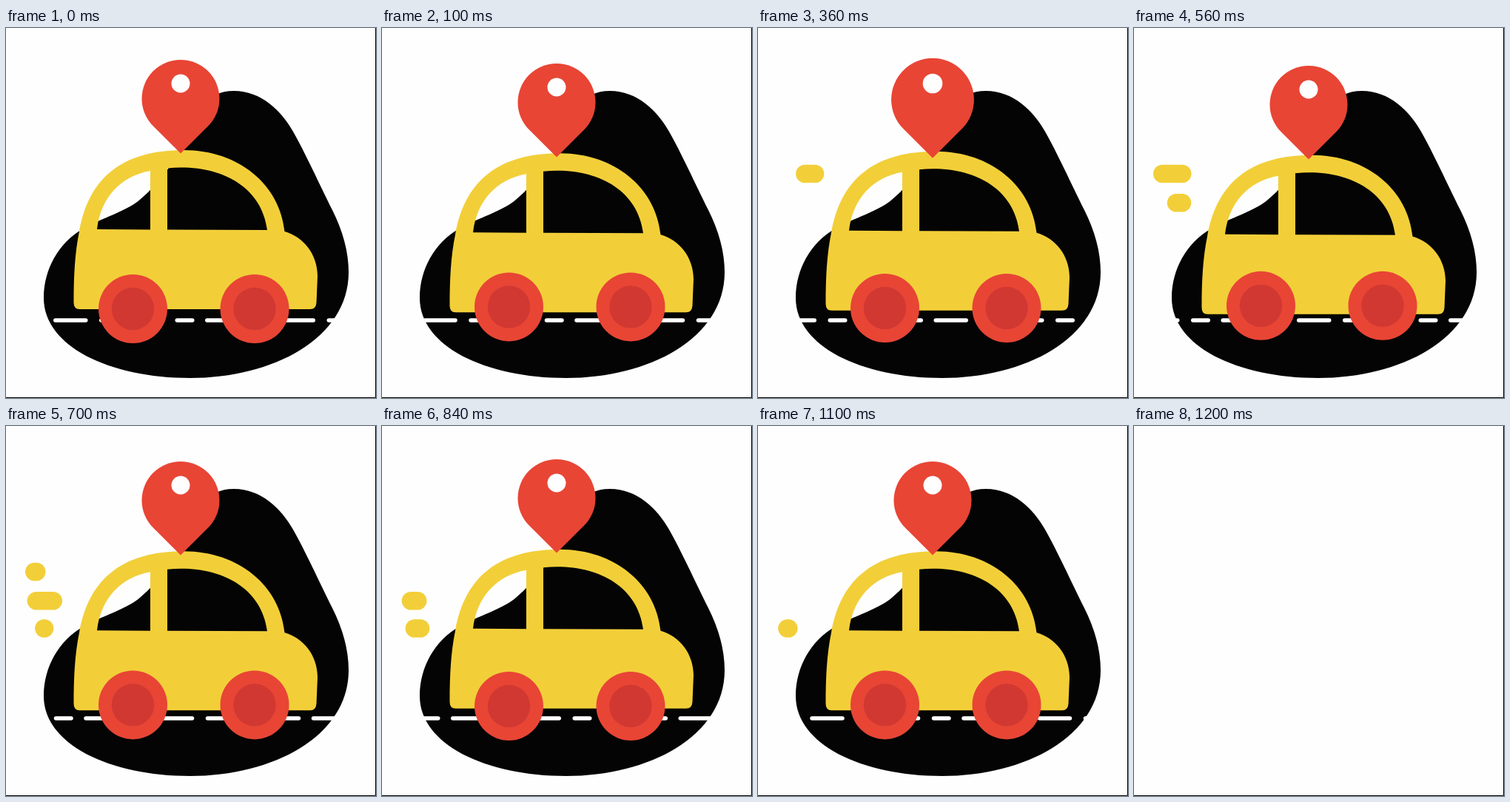
Animation, 500 px wide and 500 px high, one loop 1.22 s. Source, as an HTML page:

```html
<!DOCTYPE html>
<html lang="en">
<head>
<meta charset="utf-8">
<title>Car on the road</title>
<style>
  html, body { margin: 0; height: 100%; overflow: hidden; background: #fefefe; }
  svg { display: block; width: 100%; height: 100%; }
  .yellow { fill: #f2cf39; }
  .red { fill: #e84535; }
  .dark { fill: #d13832; }
  .streak { stroke: #f2cf39; stroke-width: 24.6; stroke-linecap: round; }
</style>
</head>
<body>
<svg viewBox="0 0 500 500">
  <g id="scene">
    <path fill="#040404" d="M308 85C345 85 372 112 388 140C404 168 424 212 441 246C455 274 463 302 463 330
      C463 420 360 473 249 473C140 473 51 430 51 365C51 325 72 290 103 272
      C128 257 165 247 182 231C205 212 225 185 240 155C255 115 270 85 308 85Z"/>
    <g id="road" stroke="#fefefe" stroke-width="5.6" stroke-linecap="round"></g>
    <path id="body" class="yellow" fill-rule="evenodd" d="M99.500 380Q91.500 380 91.500 371C91.500 335 93 304 99 275
      C112 200 160 165 240 165C315 165 370 212 376.500 275C402 282 421 306 421 335L419.500 371Q419 380 411 380Z
      M123 272C128 229 155 200 195 193V272.500Z
      M218 189.500C285 183 345 211 353 273L218 272.500Z"/>
    <g id="wheels">
      <circle class="red" cx="171.500" cy="379.500" r="46.500"/>
      <circle class="dark" cx="171.500" cy="379.500" r="28.700"/>
      <circle class="red" cx="336" cy="379.500" r="46.500"/>
      <circle class="dark" cx="336" cy="379.500" r="28.700"/>
    </g>
    <g id="pin">
      <path class="red" d="M236 169.500L198.900 132.600A52.500 52.500 0 1 1 273.100 132.600Z"/>
      <circle cx="236" cy="75" r="12.500" fill="#fefefe"/>
    </g>
    <g id="streaks"></g>
  </g>
  <path d="M499.500 0V499.500H0" fill="none" stroke="#000"/>
</svg>
<script>
const LOOP = 1220, STEP = 20, BOB = 400, PERIOD = 102.5;
const el = id => document.getElementById(id);
const ease = (t, start, length) => {
  const u = Math.min(1, Math.max(0, (t - start) / length));
  return u * u * (3 - 2 * u);
};

function addLine(parent, x1, x2, y, className = "") {
  const line = document.createElementNS("http://www.w3.org/2000/svg", "line");
  const attributes = { x1, x2, y1: y, y2: y, class: className };
  for (const name in attributes) line.setAttribute(name, attributes[name]);
  parent.append(line);
  return line;
}

// Alternating long and short road dashes
for (let i = 0; i < 7; i++) {
  const x = i * PERIOD - 38.5;
  addLine(el("road"), x + 2.8, x + 43.7, 395);
  addLine(el("road"), x + 64.8, x + 85.2, 395);
}

const streaks = [
  { y: 197, from: 77, to: 38.3, start: 240 },
  { y: 236.3, from: 65, to: 39, start: 450 },
  { y: 273.5, from: 52, to: 39.5, start: 660 }
].map(s => ({ ...s, line: addLine(el("streaks"), s.from, s.from, s.y, "streak") }));

const move = (id, x, y, extra = "") =>
  el(id).setAttribute("transform", `translate(${x} ${y})${extra}`);

function draw(t) {
  el("scene").style.display = t >= 1200 ? "none" : "";
  const phase = t % BOB / BOB;
  const bob = 1 - Math.abs(1 - 2 * phase);
  move("body", 0, 8.4 * bob);
  move("wheels", 0, -5.2 * bob);
  move("road", -0.0875 * t, 0);

  const scale = 1 + 0.13 * (ease(t, 310, 100) - ease(t, 410, 100));
  move("pin", 236, 106 + 10 * bob, ` scale(${scale}) translate(-236 -106)`);

  for (const { line, from, to, start } of streaks) {
    const head = ease(t, start, 300), tail = ease(t, start + 210, 300);
    line.setAttribute("x1", from + (to - from) * tail);
    line.setAttribute("x2", from + (to - from) * head);
    line.style.display = head > 0 && tail < 1 ? "" : "none";
  }
}

function tick() {
  draw(Math.floor(performance.now() % LOOP / STEP) * STEP);
  requestAnimationFrame(tick);
}
tick();
</script>
</body>
</html>
```
